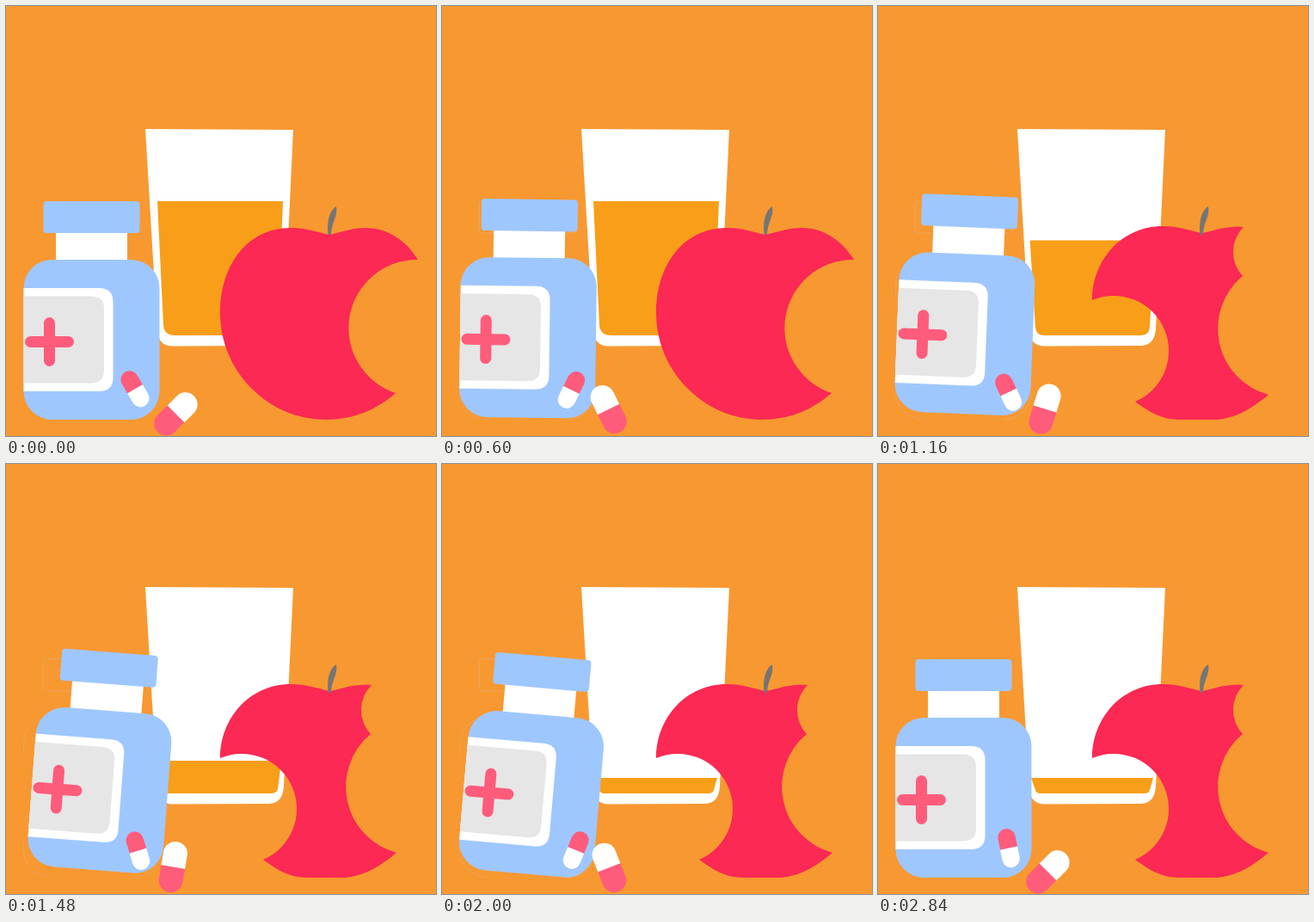
Recreate the animation shown at these times as an HTML page. Size 500x500 px, loop 2.88 s.

```html
<!DOCTYPE html>
<html lang="en">
<head>
<meta charset="utf-8">
<title>Pills, juice and apple</title>
<style>
  html, body { margin: 0; width: 100%; height: 100%; overflow: hidden; background: #f89831; }
  svg { display: block; width: 100%; height: 100%; }
  .blue { fill: #9fc7ff; }
  .white { fill: #fff; }
  .grey { fill: #e6e6e6; }
  .pink { fill: #ff5c7c; }
  .ghost { fill: none; stroke: #dcb88f; stroke-width: .7; opacity: .6; }
</style>
</head>
<body>
<svg viewBox="0 0 500 500">
  <defs>
    <clipPath id="pillArea"><rect x="100" y="424" width="100" height="76"/></clipPath>
  </defs>

  <path class="white" d="M162 143L334 144L323 375Q322 394 306 395L193 395.500Q178 395 176 379Z"/>
  <path id="juice" fill="#f89e19"/>

  <path id="apple" fill="#fb2953"/>
  <path fill="#757575" d="M374.500 266C373 250 376 238 384 233C386 245 379 250 378 266Z"/>

  <g id="ghost" class="ghost">
    <rect x="43.500" y="226.500" width="112" height="37.500" rx="4"/>
    <path d="M20.500 338V328Q20.500 300 48 295M20.500 438V448Q20.500 476 53 481M147 481Q176 478 178.500 448"/>
  </g>

  <g id="bottle">
    <rect class="white" x="58" y="260" width="83" height="40"/>
    <rect class="blue" x="43.500" y="227" width="112" height="37" rx="4"/>
    <rect class="blue" x="20.500" y="295" width="158" height="186" rx="33"/>
    <path class="white" d="M20.500 328H108Q124.500 328 124.500 344V432Q124.500 448 108 448H20.500Z"/>
    <path class="grey" d="M20.500 337.500H99Q114 337.500 114 352V424Q114 438.500 99 438.500H20.500Z"/>
    <rect class="pink" x="22" y="384" width="57" height="13" rx="6.500"/>
    <rect class="pink" x="44" y="362" width="13" height="57" rx="6.500"/>
  </g>

  <g clip-path="url(#pillArea)"><g id="smallPill"></g></g>
  <g id="bigPill"></g>
</svg>

<script>
const FRAME_MS = 40, FRAMES = 72;
const el = id => document.getElementById(id);

const WHOLE_APPLE = 'M376 266C362 263 350 258 331 258C280 258 249 302 249 357' +
  'C249 425 305 481 372 481C404 481 432 469 453 450A79.5 79.5 0 0 1 479 295' +
  'C466 274 445 258 418 258C402 258 390 263 376 266Z';
const EATEN_APPLE = 'M376 264C362 261 350 256 331 256C283 256 249 296 249 342' +
  'A64 64 0 0 1 299 460C315 472 330 481 350 481H395C420 478 437 466 454 452' +
  'A79.5 79.5 0 0 1 424 314A41 41 0 0 1 425 257C402 255 390 262 376 264Z';

// Rows: frame, then the values reached at that frame.
const BOTTLE = [ // dx, dy, angle; one shake
  [0, 0, 0, 0], [4, 9, -8.2, 10], [8, 10.8, -10, -12.5], [12, 2, -9, 3], [16, 0, 0, 0]
];
const BIG_PILL = [ // pivot x, y, angle
  [0, 189.6, 468.3, 45], [16, 185, 475, -31], [32, 184, 465, 28],
  [48, 185, 475, -31], [64, 189.6, 468.3, 45]
];
const SMALL_PILL = [ // centre x, y, angle
  [0, 150, 445.3, -30], [16, 150.5, 446.5, 30], [32, 152, 449.8, -38],
  [48, 156.5, 449.5, 30], [64, 150.5, 445.7, -31], [72, 152.3, 446.7, -9]
];
const JUICE = [[24, 227], [37, 345], [40, 365]];
const SHAKES_END = 64, BITE = 24;

function valuesAt(rows, frame) {
  if (frame <= rows[0][0]) return rows[0].slice(1);
  const i = rows.findIndex(row => row[0] > frame);
  if (i < 0) return rows[rows.length - 1].slice(1);
  const a = rows[i - 1], b = rows[i];
  const k = (frame - a[0]) / (b[0] - a[0]);
  return a.slice(1).map((v, j) => v + (b[j + 1] - v) * k);
}

function buildPill(id, radius, half, top, bottom) {
  const arc = sweep => `A${radius} ${radius} 0 0 ${sweep} ${radius}`;
  const y = half - radius;
  el(id).innerHTML =
    `<path class="${top}" d="M${-radius} .2V${-y}${arc(1)} ${-y}V.2Z"/>` +
    `<path class="${bottom}" d="M${-radius} 0V${y}${arc(0)} ${y}V0Z"/>`;
}

function place(id, x, y, angle) {
  el(id).setAttribute('transform', `translate(${x} ${y}) rotate(${angle})`);
}

function juicePath(level) {
  const full = (365 - level) / 138;
  const left = 178 - 2 * full, right = 320 + 2 * full, r = 4 + 8 * full;
  return `M${left} ${level}H${right}L316 ${383 - r}Q315 383 ${314 - r} 383` +
    `H${184 + r}Q184 383 183 ${383 - r}Z`;
}

function draw(frame) {
  const shaking = frame < SHAKES_END;
  const [dx, dy, turn] = valuesAt(BOTTLE, shaking ? frame % 16 : 0);
  el('bottle').setAttribute('transform', `translate(${dx} ${dy}) rotate(${turn} 99.5 388)`);
  el('ghost').style.display = shaking && frame % 16 ? '' : 'none';

  const [px, py, tilt] = valuesAt(BIG_PILL, frame);
  const swing = (tilt - 7) * Math.PI / 180;
  place('bigPill', px + 10 * Math.cos(swing), py + 10 * Math.sin(swing), tilt);
  place('smallPill', ...valuesAt(SMALL_PILL, frame));

  el('juice').setAttribute('d', juicePath(valuesAt(JUICE, frame)[0]));
  el('apple').setAttribute('d', frame < BITE ? WHOLE_APPLE : EATEN_APPLE);
}

function tick() {
  draw(Math.floor(performance.now() / FRAME_MS) % FRAMES);
  requestAnimationFrame(tick);
}

buildPill('bigPill', 14, 29.8, 'white', 'pink');
buildPill('smallPill', 10.2, 22.8, 'pink', 'white');
tick();
</script>
</body>
</html>
```
